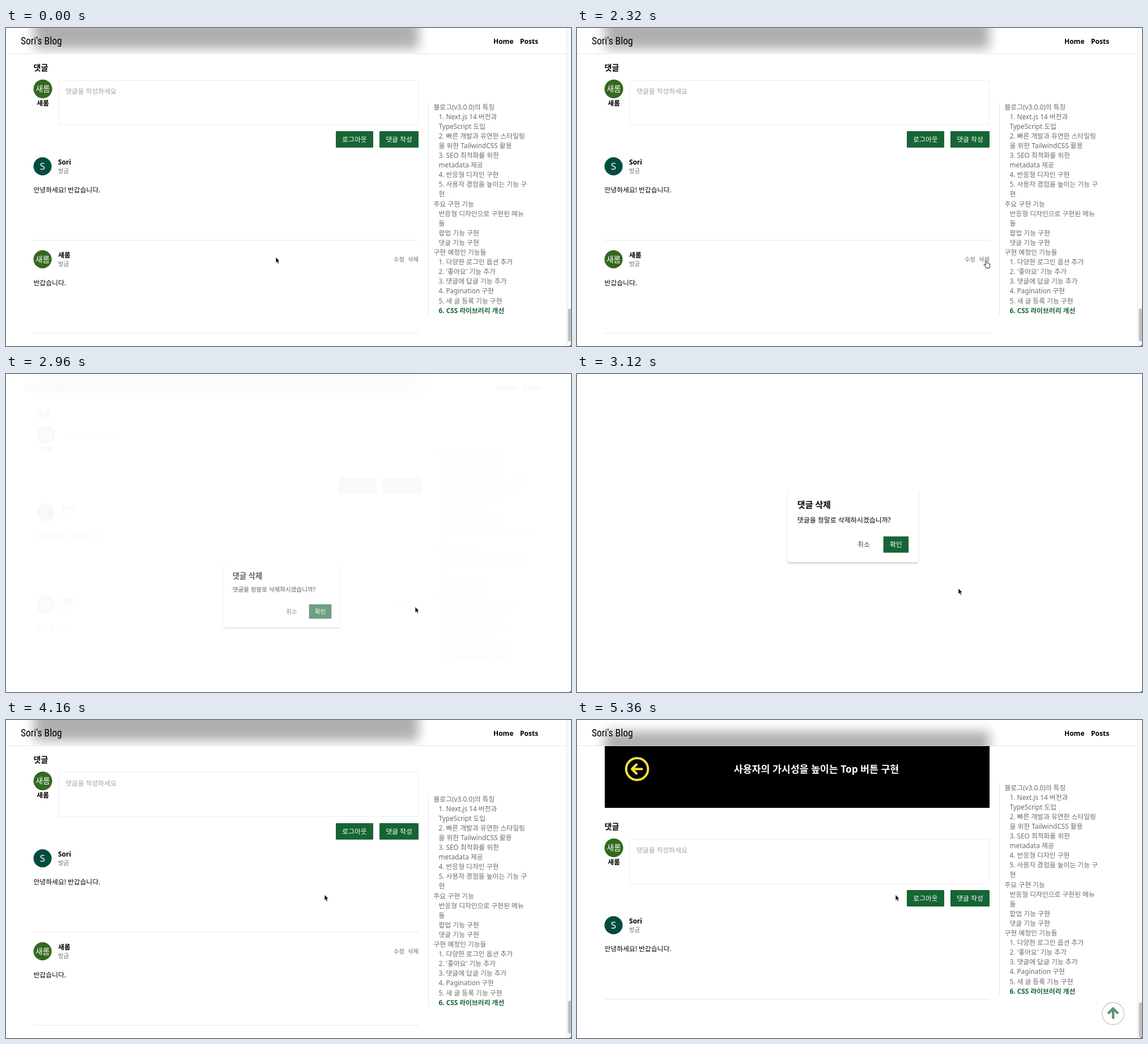
Recreate the animation shown at these times as an HTML page. Size 997 px wide and 561 px high, loop 5.88 s.

```html
<!DOCTYPE html>
<html lang="ko">
<head>
<meta charset="utf-8">
<title>Blog comments</title>
<style>
  html, body { margin: 0; width: 100%; height: 100%; overflow: hidden; background: #fff; }
  svg { display: block; width: 997px; height: 561px; }
  text { font-family: "Noto Sans", "Noto Sans CJK KR", "Noto Sans CJK", sans-serif; }
  .logo { font-family: "Roboto Condensed", Roboto, sans-serif; font-stretch: 75%; }
</style>
</head>
<body>
<svg id="stage" viewBox="0 0 997 561"></svg>
<script>
const LOOP = 5880, GREEN = '#166534', LINE = '#e5e7eb', GRAY = '#6b6b6b';
const SMALL = 10.3, BASE = 11.8;

// Text placed by the vertical middle of its line
const text = (x, mid, str, size = BASE, fill = '#000', weight = 400, extra = '') =>
  `<text x="${x}" y="${mid + size * 0.36}" font-size="${size}" fill="${fill}" font-weight="${weight}" ${extra}>${str}</text>`;
const centered = (x, mid, str, size, fill, weight) =>
  text(x, mid, str, size, fill, weight, 'text-anchor="middle"');
const rect = (x, y, w, h, fill, extra = '') =>
  `<rect x="${x}" y="${y}" width="${w}" height="${h}" fill="${fill}" ${extra}/>`;
const button = (x, y, w, h, label, id = '') =>
  rect(x, y, w, h, GREEN, `rx="1" ${id}`) + centered(x + w / 2, y + h / 2, label, BASE, '#fff', 500);
const avatar = (x, y, r, fill, label, size) =>
  `<circle cx="${x}" cy="${y}" r="${r}" fill="${fill}"/>` + centered(x, y, label, size, '#fff');

const comment = (y, color, initial, size, name, body) =>
  avatar(64.5, y, 16, color, initial, size) +
  text(92, y - 7, name, BASE, '#000', 600) +
  text(92, y + 8.5, '방금', SMALL, GRAY) +
  text(48.5, y + 41.5, body) +
  rect(49, y + 130, 679, 1, LINE);

// A leading "-" marks an indented line
const toc = ['블로그(v3.0.0)의 특징', '-1. Next.js 14 버전과', '-TypeScript 도입',
  '-2. 빠른 개발과 유연한 스타일링', '-을 위한 TailwindCSS 활용', '-3. SEO 최적화를 위한',
  '-metadata 제공', '-4. 반응형 디자인 구현', '-5. 사용자 경험을 높이는 기능 구', '-현',
  '주요 구현 기능', '-반응형 디자인으로 구현된 메뉴', '-들', '-팝업 기능 구현', '-댓글 기능 구현',
  '구현 예정인 기능들', '-1. 다양한 로그인 옵션 추가', "-2. '좋아요' 기능 추가",
  '-3. 댓글에 답글 기능 추가', '-4. Pagination 구현', '-5. 새 글 등록 기능 구현',
  '-6. CSS 라이브러리 개선'];
const tocLines = toc.map((line, i) => {
  const sub = line[0] === '-', last = i === toc.length - 1;
  return text(sub ? 763.5 : 754.5, 139.3 + i * 17.1, sub ? line.slice(1) : line,
    BASE, last ? GREEN : GRAY, last ? 700 : 400);
}).join('');

const card = rect(49, -98, 679, 135, '#000');
const arrowStroke = 'fill="none" stroke-linecap="round" stroke-linejoin="round"';

stage.innerHTML = `
<defs>
  <clipPath id="bar">${rect(0, 0, 997, 45, '#fff')}</clipPath>
  <filter id="blur" x="-10%" y="-40%" width="120%" height="180%"><feGaussianBlur stdDeviation="10"/></filter>
  <filter id="shade" x="-10%" y="-10%" width="120%" height="125%">
    <feDropShadow dx="0" dy="2" stdDeviation="1.8" flood-opacity=".22"/>
  </filter>
</defs>
<g id="page">
  <g id="content">
    ${card}
    <g ${arrowStroke} stroke="#fde03c" stroke-width="4">
      <circle cx="106" cy="-31.5" r="19.3"/>
      <path d="M114.500-31.500H97.500M105-39.500L97-31.500L105-23.500"/>
    </g>
    ${centered(422.5, -31, '사용자의 가시성을 높이는 Top 버튼 구현', 17.3, '#fff', 700)}
    ${text(48.5, 70, '댓글', 14, '#000', 700)}
    ${avatar(65, 107.5, 16.5, '#33691e', '새롬', 13.7)}
    ${centered(65, 133, '새롬', BASE, '#000', 600)}
    ${rect(93.5, 92.5, 634, 78, '#fff', 'stroke="#eceef0"')}
    ${text(105, 112, '댓글을 작성하세요', BASE, '#9ca3af')}
    ${button(582, 182, 66, 29, '로그아웃')}
    ${button(659, 182, 69, 29, '댓글 작성')}
    ${comment(244, '#004d40', 'S', 17, 'Sori', '안녕하세요! 반갑습니다.')}
    <g id="mine">
      ${comment(408, '#33691e', '새롬', 13.7, '새롬', '반갑습니다.')}
      ${text(684, 408, '수정', SMALL, GRAY)}${text(709, 408, '삭제', SMALL, GRAY)}
    </g>
  </g>
  <g id="side">${rect(745, 131, 1, 376, LINE)}${tocLines}</g>
  ${rect(-6, 0, 1003, 45, '#fff')}
  <g clip-path="url(#bar)" opacity=".31"><g id="glow"><g filter="url(#blur)">${card}</g></g></g>
  ${rect(-6, 45, 1003, 1, LINE)}
  ${text(26, 23, "Sori's Blog", 17.5, '#000', 400, 'class="logo"')}
  ${text(860, 24, 'Home', 12, '#000', 600)}
  ${text(907, 24, 'Posts', 12, '#000', 600)}
  <g id="topBtn">
    <circle cx="946" cy="518" r="19.500" fill="#fff" stroke="#bccfc3" stroke-width="1.300"/>
    <path d="M946 527V510M937 518L946 509L955 518" fill="none" stroke="#5c9371" stroke-width="4.300"/>
  </g>
</g>
<g id="scrollbar">
  ${rect(989, 0, 8, 561, '#fafafa')}${rect(989, 0, 1, 561, '#e8e8e8')}
  ${rect(991.5, 495, 6, 58, '#c1c1c1', 'rx="3" id="thumb"')}
</g>
${rect(0, 0, 997, 561, '#fff', 'id="veil"')}
<g id="popup">
  ${rect(373, 218, 228, 126, '#fff', 'rx="4" filter="url(#shade)"')}
  ${text(390, 243.5, '댓글 삭제', 14.8, '#000', 700)}
  ${text(390, 270.5, '댓글을 정말로 삭제하시겠습니까?')}
  ${text(495, 313.5, '취소', BASE, GREEN, 500)}
  ${button(540, 299, 44, 28.5, '확인', 'id="confirm"')}
</g>
${rect(995, 560, 2, 1, '#000')}
<g id="cursor" stroke-linejoin="round">
  <path id="arrow" d="M0 0V10.500L2.300 8.400L4 12L5.800 11.200L4.200 7.700H7.200Z" stroke="#fff" stroke-width=".8"/>
  <path id="hand" d="M-1.500 1Q-.500-.800 .700 1L1.600 4.500Q2.500 3.400 3.600 4.600Q4.600 3.900 5.400 5.200Q6.600 4.800 6.700 6.500V9L5.500 11.500V13H-.300V11.800L-3.800 7.800Q-4.200 6.200-2.600 6.300L-.600 7.500Z"
    fill="#fff" stroke="#000" stroke-width=".9"/>
</g>`;

const $ = id => document.getElementById(id);
const set = (id, attrs) => { for (const k in attrs) $(id).setAttribute(k, attrs[k]); };
const show = (id, on) => set(id, { visibility: on ? 'visible' : 'hidden' });
const ramp = (t, a, b) => Math.min(1, Math.max(0, (t - a) / (b - a)));
const ease = u => u * u * (3 - 2 * u);

// Pointer stops: time, x, y
const stops = [[1290, 476, 404], [1880, 676, 424], [1920, 676, 424], [2320, 722, 410.5],
  [2970, 722, 410.5], [3360, 575, 313], [3390, 575, 313], [3520, 562, 308]];
function pointer(t) {
  let [, x, y] = stops[0];
  for (let i = 1; i < stops.length; i++) {
    const [a, x0, y0] = stops[i - 1], [b, x1, y1] = stops[i];
    if (t >= a) {
      const u = ease(ramp(t, a, b));
      x = x0 + (x1 - x0) * u;
      y = y0 + (y1 - y0) * u;
    }
  }
  return [x, y];
}

// Remaining distance of an underdamped spring, from 1 to 0
function spring(ms) {
  const s = Math.max(0, ms) / 1000, w = 18.5, d = 12.5;
  return Math.exp(-d * s) * (Math.cos(w * s) + d / w * Math.sin(w * s));
}

function draw(t) {
  const open = t >= 2800 && t < 4140, deleted = t >= 4200;
  const leave = 1 - ramp(t, 4060, 4150);
  const veil = (1 - (1 - ramp(t, 2790, 3000)) ** 2) * leave;
  const gap = t < 3400 ? spring(t - 2960) : 0;
  const scale = 1 - 0.1 * gap;
  const [x, y] = pointer(t);

  const shift = `translate(0 ${deleted ? 118 : 0})`;
  set('content', { transform: shift });
  set('glow', { transform: shift });
  set('side', { transform: `translate(0 ${deleted ? -20 : 0})` });
  set('page', { transform: `translate(${open ? 5.5 : 0} 0)` });
  set('thumb', { y: deleted ? 498 : 495, height: deleted ? 62 : 58 });
  set('topBtn', { opacity: ramp(t, 4190, 4360) });
  show('mine', !deleted);
  show('scrollbar', !open);

  set('veil', { opacity: veil });
  set('popup', {
    opacity: ramp(t, 2838, 3038) * leave,
    transform: `translate(487 ${281 + 109 * gap}) scale(${scale}) translate(-487 -281)`
  });

  const onConfirm = t >= 3040 && t < 4140 && x > 540 && x < 584 && y > 299 && y < 327;
  const onLink = t < 2800 && x > 683 && x < 729 && y > 401 && y < 416;
  set('confirm', { fill: onConfirm ? '#15803d' : GREEN });
  set('cursor', { transform: `translate(${x} ${y})` });
  show('arrow', !onConfirm && !onLink);
  show('hand', onConfirm || onLink);
}

const start = performance.now();
function frame() {
  draw((performance.now() - start) % LOOP);
  requestAnimationFrame(frame);
}
frame();
</script>
</body>
</html>
```
